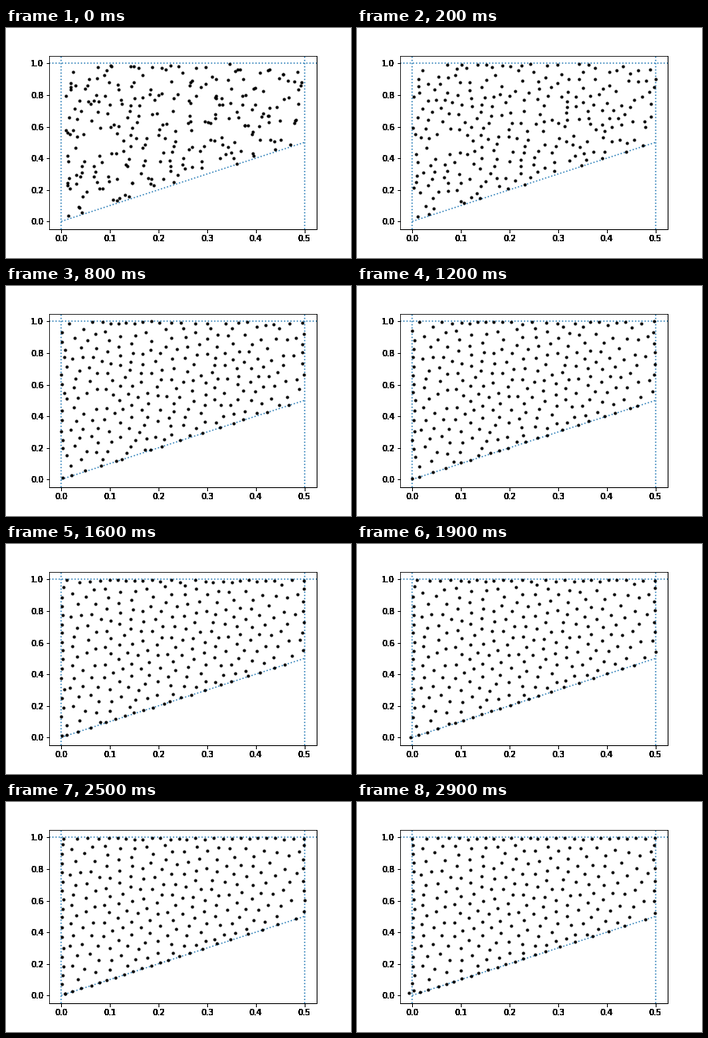
Write a matplotlib script that moves like this. It is 432 by 288 pixels and loops after 3000 ms.

```python
import numpy as np
import matplotlib.pyplot as plt
from matplotlib.animation import FuncAnimation

FRAMES = 30
COUNT = 260
METRIC = np.array([1.0, 0.36])   # makes x and y distances comparable
REACH = 0.1                      # how far a dot pushes its neighbours
PUSH = 3.5e-7                    # strength of the inverse square push
MAX_STEP = 0.006
REBOUND = 2.5                    # how hard dots bounce off the straight walls


def fold(p):
    """Bounce dots back into the region 0 < x < 0.5, x < y < 1."""
    x, y = p.T
    x = np.where(x < 0, -REBOUND * x, x)
    x = np.where(x > 0.5, 0.5 - REBOUND * (x - 0.5), x)
    y = np.where(y > 1, 1 - REBOUND * (y - 1), y)
    return np.column_stack([np.minimum(x, y), np.maximum(x, y)])


def scatter_dots(rng):
    """Spread dots loosely: an even sequence blurred by random noise."""
    n = np.arange(1, 2 * COUNT)[:, None]
    p = n * [0.754878, 0.569840] % 1 * [0.5, 1]
    p = p[p[:, 1] > p[:, 0]][:COUNT]
    return fold(p + rng.normal(0, 0.013, p.shape) / METRIC)


def relax(p):
    """Move every dot away from its close neighbours."""
    q = p * METRIC
    gap = q[:, None] - q[None]
    dist = np.hypot(gap[..., 0], gap[..., 1]) + 1e-9
    force = np.where(dist < REACH, PUSH / dist**2, 0)
    move = (gap * (np.minimum(force, MAX_STEP) / dist)[..., None]).sum(axis=1)
    size = np.hypot(*move.T)[:, None] + 1e-9
    return fold(p + move * np.minimum(1, MAX_STEP / size) / METRIC)


def make_axes(fig):
    ax = fig.add_axes([0.125, 0.125, 0.775, 0.755])
    ax.set(xlim=(-0.025, 0.525), ylim=(-0.05, 1.0499),
           xticks=np.arange(6) / 10, yticks=np.arange(6) / 5)
    return ax


states = [scatter_dots(np.random.default_rng(12))]
for _ in range(FRAMES - 1):
    states.append(relax(states[-1]))

plt.rcParams.update({"font.family": "DejaVu Sans", "font.size": 10})
fig = plt.figure(figsize=(6, 4), dpi=72, facecolor="white")

ax = make_axes(fig)
for x in (0, 0.5):
    ax.axvline(x, ls=":", color="C0")
ax.axhline(1, ls=":", color="C0")
ax.plot([0, 0.5], [0, 0.5], ls=":", color="C0")
dots, = ax.plot([], [], "k.", zorder=3)

# Stacked copies turn the soft edges outside the plot area solid black.
for _ in range(12):
    layer = make_axes(fig)
    layer.patch.set_visible(False)
    layer.spines[["top", "left"]].set_visible(False)


def draw(i):
    dots.set_data(*states[i].T)
    return dots,


anim = FuncAnimation(fig, draw, frames=FRAMES, init_func=lambda: draw(0),
                     interval=100, repeat=True, repeat_delay=0)
plt.show()
```
